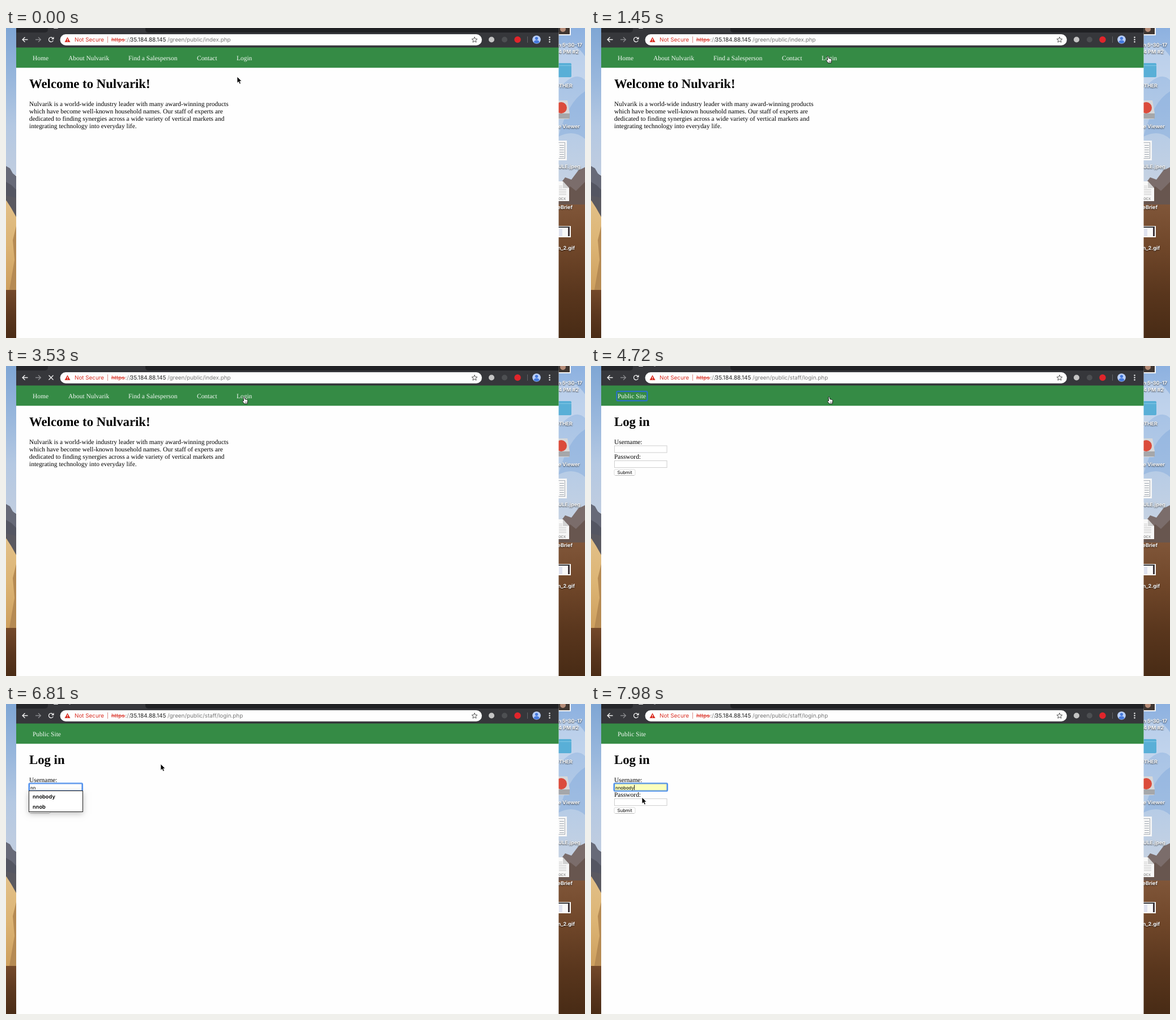
An HTML page with a canvas that plays this animation: 1022 px wide and 548 px high, repeating every 8 s.

```html
<!DOCTYPE html>
<html lang="en">
<head>
<meta charset="utf-8">
<title>Login demo</title>
<style>
  html, body { margin: 0; width: 100%; height: 100%; overflow: hidden; }
  canvas { display: block; }
</style>
</head>
<body>
<canvas id="stage" width="1022" height="548"></canvas>
<script>
const ctx = document.getElementById('stage').getContext('2d');
ctx.textRendering = 'geometricPrecision';
const LOOP = 8000, TICK = 147.9;
const SERIF = '"Liberation Serif", serif', SANS = 'Inter, sans-serif';
const BODY = `11.45px ${SERIF}`, HEADING = `bold 22.76px ${SERIF}`;
const URL_FONT = `9.85px ${SANS}`, HOST_FONT = `10px ${SANS}`, FIELD = `7.9px ${SANS}`;

// Pointer path: tick, x, y
const PATH = [
  [0, 408, 86], [3, 412, 78], [8, 415, 56], [10, 418, 50], [11, 398, 35],
  [12, 350, 58], [13, 362, 92], [14, 405, 102], [15, 440, 98], [16, 453, 84],
  [17, 459, 60], [18, 430, 43], [20, 421, 49], [22, 420, 55], [39, 420, 55],
  [42, 380, 72], [46, 273, 106], [47, 160, 152], [48, 70, 214], [49, 20, 196],
  [50, 62, 174], [51, 90, 165]
];

const EVENTS = { load: 3530, login: 3830, linkFocus: 4720, fieldFocus: 5320,
  firstKey: 6360, secondKey: 6510, hover: 7400, fill: 7840, caret: 7970 };

function rect(x, y, w, h, color) {
  ctx.fillStyle = color;
  ctx.fillRect(x, y, w, h);
}
function paint(fill, stroke, width = 1) {
  if (fill) { ctx.fillStyle = fill; ctx.fill(); }
  if (stroke) { ctx.strokeStyle = stroke; ctx.lineWidth = width; ctx.stroke(); }
}
function round(x, y, w, h, r, fill, stroke, width) {
  ctx.beginPath();
  ctx.roundRect(x, y, w, h, r);
  paint(fill, stroke, width);
}
function circle(x, y, r, fill) {
  ctx.beginPath();
  ctx.arc(x, y, r, 0, 7);
  paint(fill);
}
function shape(d, fill, stroke, width, x = 0, y = 0) {
  ctx.save();
  ctx.translate(x, y);
  const path = new Path2D(d);
  if (fill) { ctx.fillStyle = fill; ctx.fill(path); }
  if (stroke) { ctx.strokeStyle = stroke; ctx.lineWidth = width; ctx.stroke(path); }
  ctx.restore();
}
function text(str, x, y, font, color = '#000', align = 'left') {
  ctx.font = font;
  ctx.fillStyle = color;
  ctx.textAlign = align;
  ctx.fillText(str, x, y);
}
function gradient(x, y, w, h, ...colors) {
  const g = ctx.createLinearGradient(0, y, 0, y + h);
  colors.forEach((c, i) => g.addColorStop(i / (colors.length - 1), c));
  rect(x, y, w, h, g);
}

function drawDesktop() {
  gradient(0, 0, 18, 260, '#7fa6d4', '#97b6dc', '#b4c8e2', '#c0cde0');
  shape('M0 244 L7 248 L12 257 L18 262 V335 H0Z', '#676a78');
  shape('M0 272 L10 278 L18 286 V335 H0Z', '#545662');
  gradient(0, 305, 18, 159, '#e2c088', '#dcb474', '#cd9f5e');
  shape('M18 300 V334 L9 318 L0 304 V296Z', '#5a5960');
  shape('M18 350 L12 375 L15 410 L6 463 H18Z', '#b58a53');
  gradient(0, 463, 18, 85, '#74492a', '#5c381f', '#4a2c16');

  gradient(975, 0, 47, 280, '#8db1e0', '#a9c4e6', '#b7cce6', '#c6d2e2');
  shape('M975 30 Q1000 18 1022 50 V92 Q1004 74 975 108Z', 'rgba(220,230,244,.5)');
  shape('M1022 112 Q992 130 975 192 Q1002 178 1022 196Z', 'rgba(120,163,217,.4)');
  shape('M975 280 L987 264 L998 268 L1010 252 L1022 246 V345 H975Z', '#7b6d6b');
  shape('M975 298 L996 280 L1006 288 L1022 272 V345 H975Z', '#68564f');
  gradient(975, 312, 47, 236, '#805639', '#6f4629', '#59361d', '#482b15');

  rect(970, 0, 27, 13, '#f4f4f4');
  rect(970, 0, 25, 11, '#3f3631');
  circle(983, 2, 5, '#b58c78');
  round(960, 62, 38, 25, 2, '#59afd7');
  rect(960, 66, 38, 1, '#84c8e5');
  shape('M964 128 H991 L995 151 V158 Q995 161 992 161 H964Z', '#d6d7d9');
  rect(964, 151, 31, 9, '#a5a7aa');
  circle(980, 141, 10, '#db4b3b');
  rect(964, 199, 26, 35, '#f6f6f6');
  ctx.strokeStyle = '#aab0b8';
  ctx.lineWidth = 1;
  ctx.strokeRect(966.5, 202.5, 20, 28);
  for (let y = 207; y < 228; y += 4) rect(977, y, 8, 1, '#9ea6b0');
  shape('M964 271 H983 L994 283 V306 H964Z', '#f7f7f7');
  shape('M983 271 V283 H994Z', '#d2d2d2');
  for (let y = 279; y < 297; y += 3) rect(976, y, y < 284 ? 6 : 13, 1, '#c9c9c9');
  text('DOCX', 988, 304, `6px ${SANS}`, '#666', 'right');
  rect(964, 350, 33, 20, '#f8f8f8');
  rect(964, 351, 31, 2, '#36383c');
  rect(992, 353, 3, 15, '#3c3236');
  rect(976, 355, 6, 13, '#dfe2ef');

  ctx.save();
  ctx.shadowColor = 'rgba(0,0,0,.8)';
  ctx.shadowBlur = 2;
  ctx.shadowOffsetY = 1;
  [['n 5-30-17', 1017, 33], ['4 PM #2', 1011, 45], ['OTHER', 1000, 105], ['e Viewer', 1013, 177],
   ['ULE.jpeg', 1014, 248], ['eBrief', 1000, 320], ['n_2.gif', 1004, 392]]
    .forEach(([label, x, y]) => text(label, x, y, `bold 9px ${SANS}`, '#fff', 'right'));
  ctx.restore();
}

function drawToolbar(loading, login) {
  rect(18, 0, 957.5, 35, '#36373b');
  round(18, -8, 56, 16, [0, 0, 5, 0], '#25262a');
  round(246, -8, 729.5, 16, [0, 0, 0, 5], '#202124');
  if (!loading) round(84, -4, 8, 5, 1, '#eee');
  if (login) rect(111, 0, 3, 1, '#8c8d90');

  const arrow = 'M5 0 H-4 M0 -4.3 L-4.4 0 L0 4.3';
  shape(arrow, null, '#f1f1f1', 1.4, 33.5, 20.5);
  ctx.save();
  ctx.translate(57, 20.5);
  ctx.scale(-1, 1);
  shape(arrow, null, '#88898c', 1.3);
  ctx.restore();
  if (loading) {
    shape('M-4 -4 L4 4 M4 -4 L-4 4', null, '#f1f1f1', 1.4, 79.5, 20.5);
  } else {
    ctx.beginPath();
    ctx.arc(79.5, 20.5, 4, .35, 5.4);
    paint(null, '#f1f1f1', 1.4);
    shape('M84.5 15.5 V20 H80Z', '#f1f1f1');
  }

  round(95.5, 11, 744.5, 19.7, 9.85, '#fefefe');
  shape('M108.5 16 L113.5 25 H103.5Z', '#d93025');
  rect(108, 19, 1, 3, '#fff');
  rect(108, 23, 1, 1, '#fff');
  text('Not Secure', 121, 24.3, URL_FONT, '#d93025');
  rect(179, 15, 1, 11, '#dc8b85');
  text('https', 186, 24.3, URL_FONT, '#d93025');
  rect(185.5, 20.5, 25, 1, '#d93025');
  text('://', 210.5, 24.3, URL_FONT, '#777');
  text('35.184.88.145', 219, 24.3, HOST_FONT, '#222');
  text(login ? '/green/public/staff/login.php' : '/green/public/index.php', 285, 24.3, URL_FONT, '#777');

  ctx.beginPath();
  for (let i = 0; i < 10; i++) {
    const r = i % 2 ? 2.3 : 5.2, a = i * Math.PI / 5 - Math.PI / 2;
    ctx.lineTo(827 + r * Math.cos(a), 21 + r * Math.sin(a));
  }
  ctx.closePath();
  paint(null, '#555');

  circle(857, 20.5, 5, '#c4c4c4');
  circle(880, 20.5, 5, '#4d4f52');
  circle(903, 20.5, 5.7, '#e0252b');
  rect(920, 15, 1, 11, '#626367');
  circle(936.5, 20.5, 7.3, '#b9cff8');
  circle(936.5, 18.3, 2.6, '#4579dc');
  shape('M931.5 25.5 Q932 21.5 936.5 21.5 Q941 21.5 941.5 25.5 Q936.5 29 931.5 25.5Z', '#4579dc');
  [16.5, 20.5, 24.5].forEach(y => circle(959.5, y, 1.2, '#f1f1f1'));
}

function drawHome() {
  [['Home', 47], ['About Nulvarik', 110], ['Find a Salesperson', 216], ['Contact', 337], ['Login', 407]]
    .forEach(([label, x]) => text(label, x, 57, BODY, '#f4faf5'));
  text('Welcome to Nulvarik!', 41, 106, HEADING);
  ['Nulvarik is a world-wide industry leader with many award-winning products',
   'which have become well-known household names. Our staff of experts are',
   'dedicated to finding synergies across a wide variety of vertical markets and',
   'integrating technology into everyday life.']
    .forEach((line, i) => text(line, 41, 138 + i * 12.95, BODY));
}

function drawField(y, value, focused, filled) {
  if (focused) round(40.5, y - .5, 94.5, 14, 2, null, '#5b9bf5', 2.2);
  rect(41, y, 93, 13, filled ? '#faffbd' : '#fff');
  ctx.strokeStyle = focused ? '#3f7fe0' : '#cfcfcf';
  ctx.lineWidth = 1;
  ctx.strokeRect(41.5, y + .5, 92.5, 12);
  text(value, 43, y + 10, FIELD);
}

function drawLogin(t) {
  const focused = t >= EVENTS.fieldFocus, filled = t >= EVENTS.fill;
  if (t >= EVENTS.linkFocus && !focused) round(45.3, 44.8, 54, 16.5, 2, null, '#2a70c8', 2.2);
  text('Public Site', 47, 57, BODY, '#f4faf5');
  text('Log in', 41, 106, HEADING);
  text('Username:', 41, 138, BODY);
  text('Password:', 41, 164, BODY);

  const value = filled ? 'nnobody' : t >= EVENTS.secondKey ? 'nn' : t >= EVENTS.firstKey ? 'n' : '';
  drawField(140.5, value, focused, filled);
  drawField(167, '', false, false);
  round(41, 183, 37, 10.5, 2, '#fff', '#d2d2d2', .8);
  rect(43, 193, 33, 1, '#bbb');
  text('Submit', 59.5, 190.8, FIELD, '#000', 'center');

  if (focused && !value || t >= EVENTS.caret) {
    ctx.font = FIELD;
    rect(Math.round(43 + ctx.measureText(value).width), 143, 1, 9, '#222');
  }
  if (value && !filled) drawSuggestions(t >= EVENTS.hover);
}

function drawSuggestions(hovered) {
  ctx.save();
  ctx.shadowColor = 'rgba(0,0,0,.25)';
  ctx.shadowBlur = 10;
  ctx.shadowOffsetY = 3;
  rect(40, 153, 96, 38, '#fff');
  ctx.restore();
  if (hovered) rect(41, 155, 94, 17, '#dcdcdc');
  ctx.strokeStyle = '#222';
  ctx.lineWidth = 1;
  ctx.strokeRect(40.5, 153.5, 95, 37);
  text('nnobody', 47, 167.3, `600 9.3px ${SANS}`);
  text('nnob', 47, 184.6, `600 9.3px ${SANS}`);
}

function pointerAt(t) {
  const tick = Math.floor((t + 40) / TICK);
  const next = PATH.findIndex(p => p[0] > tick);
  if (next < 0) return PATH.at(-1).slice(1);
  const [t0, x0, y0] = PATH[next - 1], [t1, x1, y1] = PATH[next];
  const k = (tick - t0) / (t1 - t0);
  return [x0 + (x1 - x0) * k, y0 + (y1 - y0) * k];
}

function drawPointer(t) {
  const [x, y] = pointerAt(t);
  const overLink = x > 404 && x < 438 && y > 46 && y < 62;
  if (overLink) {
    shape('M-1 0 Q.3 -1 1.2 .4 L2 4 Q3 3.2 4 4.2 Q5.2 3.8 5.7 5 Q7 5 6.8 7 L6 11.8 H.6 L-2.6 7.5 Q-2.6 5.8 -.4 6.8Z',
      '#fff', '#111', .9, x, y);
    shape('M2 8 V10.3 M3.6 8 V10.3 M5.1 8 V10.3', null, '#333', .6, x, y);
  } else {
    shape('M0 0 V11.3 L2.6 8.9 L4.3 13 L6.4 12.1 L4.7 8.1 H8.1Z', '#000', '#fff', .8, x, y);
  }
}

function draw(now) {
  const t = now % LOOP, login = t >= EVENTS.login;
  drawDesktop();
  rect(18, 0, 957.5, 548, '#fefefe');
  drawToolbar(t >= EVENTS.load && !login, login);
  rect(18, 34.5, 957.5, 35.8, '#358b45');
  if (login) drawLogin(t); else drawHome();
  drawPointer(t);
}

const start = performance.now();
function loop() {
  draw(performance.now() - start);
  requestAnimationFrame(loop);
}
loop();
</script>
</body>
</html>
```
